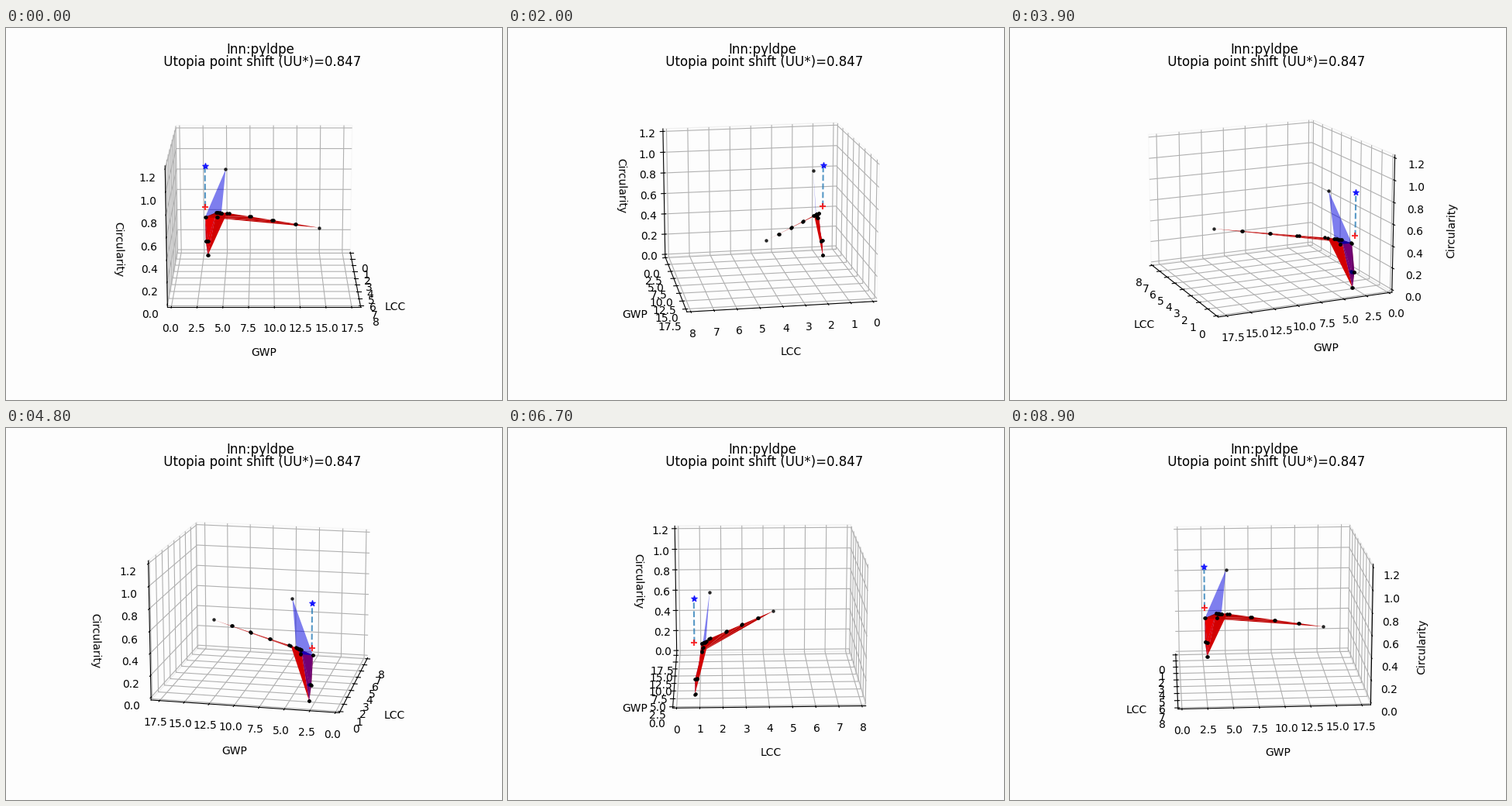
These frames come from a looping animation (640 by 480 pixels, 9000 ms). A matplotlib script:

```python
import numpy as np
import matplotlib.pyplot as plt
from matplotlib.animation import FuncAnimation

FRAMES, INTERVAL = 90, 100
ELEV, STEP = 15, 4
LIMITS = np.array([8, 18, 1.2])      # LCC, GWP, circularity
SIZE = np.array([4, 4, 3])           # relative box sides
PAPER = "#fdfdfd"

# Key trade-off points as (LCC, GWP, circularity)
foot = np.array([0.78, 2.96, 0])
low = np.array([0.79, 2.76, 0.143])
inner = np.array([0.88, 2.97, 0.143])
corner = np.array([1.095, 2.74, 0.394])
middle = np.array([1.14, 3.98, 0.397])
peak = np.array([1.46, 4.98, 0.876])
tip = np.array([4.427, 14.54, 0.477])

# The knee is a short row; the tail runs from the tip in widening pairs
knee = np.linspace((1.09, 3.91, 0.438), (1.28, 4.48, 0.443), 4)
k = np.arange(1, 5)
t = np.concatenate([k / 4 - 0.003 * k, k / 4 + 0.003 * k])[:, None]
tail = tip + t * (np.array([1.45, 5.2, 0.452]) - tip)
tail[:, 0] -= 0.08 * (t * (1 - t))[:, 0]

near = np.vstack([foot, low, corner, middle, knee])
blue_pts = np.vstack([near, inner, peak])
red_pts = np.vstack([near, inner, tail, tip])

# Best value on every axis, with and without the peak
best = red_pts.min(axis=0)[:2]
utopia = np.append(best, blue_pts[:, 2].max())
shifted = np.append(best, red_pts[:, 2].max())

fig = plt.figure(figsize=(6.4, 4.8), dpi=100, facecolor=PAPER)
ax = fig.add_subplot(projection="3d", computed_zorder=False, facecolor=PAPER)
ax.set_title("Inn:pyldpe\n Utopia point shift (UU*)=0.847", linespacing=0.9)
ax.set_xlabel("LCC", labelpad=10)
ax.set_ylabel("GWP", labelpad=10)
ax.set_zlabel("Circularity", labelpad=10)
for axis in (ax.xaxis, ax.yaxis, ax.zaxis):
    axis.pane.fill = False


def dots(points, color="k", marker=".", s=20, alpha=1.0, z=14):
    return ax.scatter(*np.atleast_2d(points).T, c=color, marker=marker, s=s,
                      alpha=alpha, depthshade=False, zorder=z)


blue = ax.plot_trisurf(*blue_pts.T, color="b", alpha=0.5)
red = ax.plot_trisurf(*red_pts.T, color="r", zorder=11)

for shift in (0, np.array([0.01, 0.05, 0.002])):
    dots(near + shift)
    dots(inner + shift, z=12)
dots(tail)
dots([peak, tip], alpha=0.75)

ax.plot(*np.array([shifted, utopia]).T, "--", color="C0", alpha=0.75, zorder=2)
dots(utopia, "b", "*", 30, 0.8)
plus = dots(shifted, "r", "+", 30, 0.8)

# Fixed limits with a thin margin around the ticks
pad = LIMITS / 48
ax.set_xlim(-pad[0], LIMITS[0] + pad[0])
ax.set_ylim(-pad[1], LIMITS[1] + pad[1])
ax.set_zlim(-pad[2], LIMITS[2] + pad[2])
ax.set_xticks(np.arange(9))
ax.set_yticks(np.arange(0, 18, 2.5))
ax.set_zticks(np.arange(7) / 5)


def nearness(points, azim):
    """How close the nearest of the points comes to the camera."""
    a, e = np.radians([azim, ELEV])
    eye = np.array([np.cos(e) * np.cos(a), np.cos(e) * np.sin(a), np.sin(e)])
    return np.max((points / LIMITS * SIZE) @ eye)


def update(i):
    azim = STEP * i
    ax.view_init(elev=ELEV, azim=azim)
    front = nearness(blue_pts, azim)
    blue.set_zorder(13 if front > nearness(red_pts, azim) + 1e-9 else 10)
    plus.set_zorder(14 if nearness(shifted, azim) > front else 9)
    return []


anim = FuncAnimation(fig, update, frames=FRAMES, interval=INTERVAL,
                     repeat=True, repeat_delay=0, blit=False)
plt.show()
```
